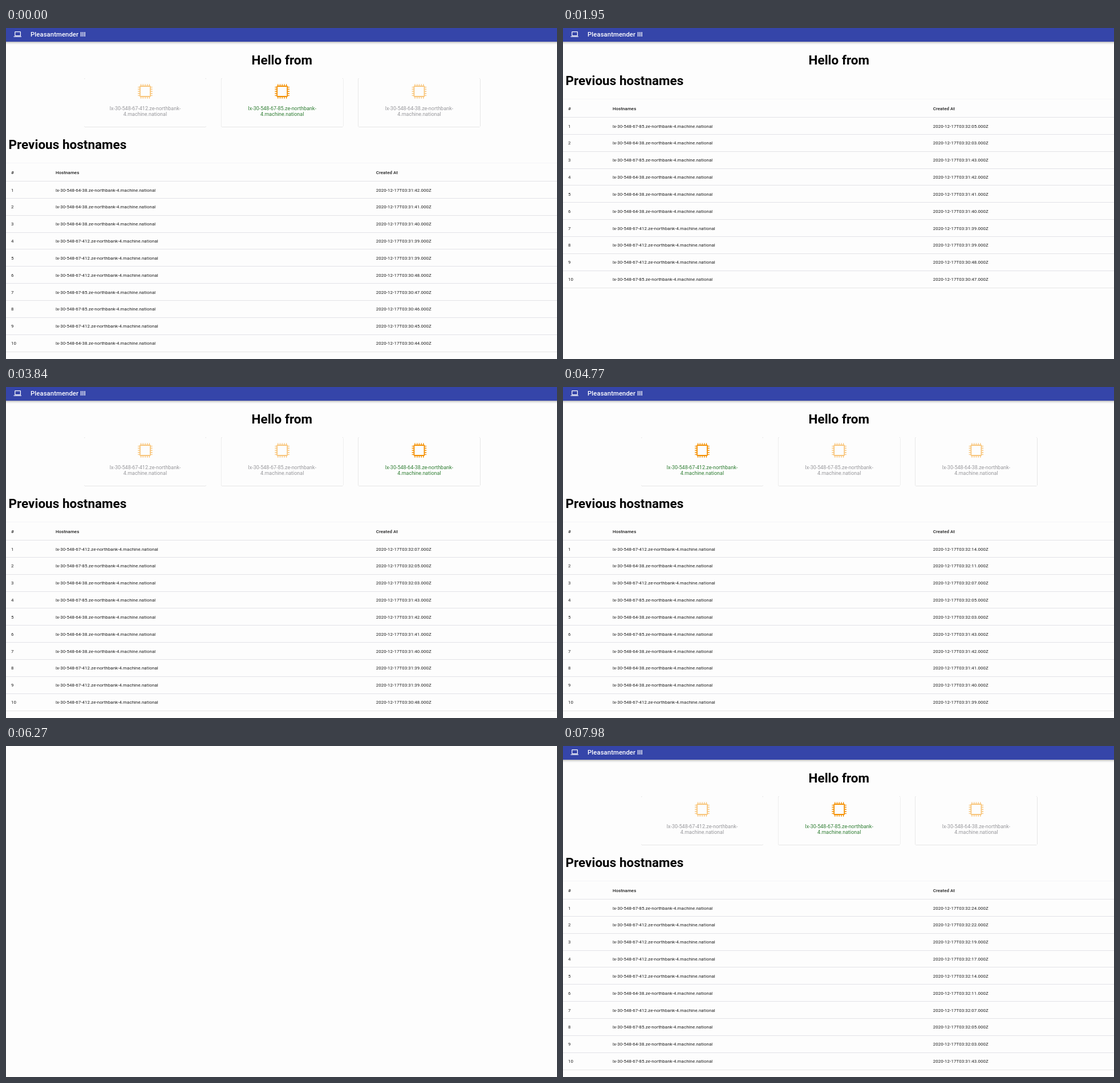
Write an HTML page that moves like this. It is 966 by 580 pixels and loops after 8 s.

```html
<!DOCTYPE html>
<html lang="en">
<head>
<meta charset="utf-8">
<title>Host dashboard</title>
<style>
  html, body { margin: 0; width: 100%; height: 100%; overflow: hidden; background: #fdfdfd; }
  svg { display: block; width: 100vw; height: 100vh; font-family: Roboto, sans-serif; }
  h1, .heading { font-size: 22.5px; font-weight: 700; }
  .bar { fill: #3545a9; filter: drop-shadow(0 1px 2px rgba(0, 0, 0, .38)); }
  .title { font-size: 11.3px; font-weight: 500; letter-spacing: .0075em; fill: #fff; }
  .cell { font-size: 7.88px; letter-spacing: .0107em; fill: #1c1c1c; }
  .head { font-weight: 500; }
  .rule { fill: #e2e2e7; }
  .paper { fill: #fdfdfd; filter: drop-shadow(0 .8px .7px rgba(0, 0, 0, .36)); }
  .host { font-size: 9px; text-anchor: middle; fill: #2e7d32; }
  .chip { fill: none; stroke: #f49000; }
  .idle .host { fill: #97979b; }
  .idle .chip { opacity: .5; }
</style>
</head>
<body>
<svg id="stage" viewBox="0 0 966 580" preserveAspectRatio="none"></svg>
<script>
const LOOP = 8000, ROWS = 10, BLANK = 100, NO_CARDS = 180, ROW_HEIGHT = 29.85;
const stage = document.getElementById('stage');

const hosts = { A: 'lx-30-548-67-412', B: 'lx-30-548-67-85', C: 'lx-30-548-64-38' };
const ZONE = '.ze-northbank-', SUFFIX = '4.machine.national';

// Every visit, oldest first: host key, then minute and second.
const visits = ('C30:44 A30:45 B30:46 B30:47 A30:48 A31:39 A31:39 C31:40 C31:41 C31:42 ' +
  'B31:43 C32:03 B32:05 A32:07 C32:11 A32:14 A32:17 A32:19 A32:22 B32:24 B32:26')
  .split(' ').map(v => ({ host: v[0], time: `2020-12-17T03:${v.slice(1)}.000Z` }));

// Page reloads; some swap pages without a white flash.
const loads = [
  { at: -LOOP }, { at: 480, flash: true }, { at: 1130 }, { at: 1830, flash: true },
  { at: 3000, flash: true }, { at: 4090, flash: true }, { at: 4450, flash: true },
  { at: 5300 }, { at: 6200, flash: true }, { at: 6830, flash: true }, { at: 7450, flash: true }
];

const text = (cls, x, y, content, extra = '') =>
  `<text class="${cls}" x="${x}" y="${y}" ${extra}>${content}</text>`;
const rect = (cls, x, y, w, h, extra = '') =>
  `<rect class="${cls}" x="${x}" y="${y}" width="${w}" height="${h}" ${extra}/>`;

function header() {
  return rect('bar', -5, -5, 976, 29) +
    `<g fill="none" stroke="#fff" stroke-width="1.2">
      <rect x="15.8" y="6.7" width="9.6" height="6.9" rx=".6"/><path d="M13.5 15.1H27"/></g>` +
    text('title', 43, 14.8, 'Pleasantmender III') +
    text('heading', 483.8, 64, 'Hello from', 'text-anchor="middle"');
}

function chip(x, y) {
  let pins = '';
  for (let i = -2; i <= 2; i++) {
    const p = i * 3.7;
    pins += `M${p} -12.8V-9M${p} 9V12.8M-12.8 ${p}H-9M9 ${p}H12.8`;
  }
  return `<g class="chip" transform="translate(${x} ${y})">
    <rect x="-9" y="-9" width="18" height="18" rx=".8" stroke-width="1.8"/>
    <path d="${pins}" stroke-width="1.4"/></g>`;
}

function cards(active) {
  return Object.keys(hosts).map((key, i) => {
    const x = 137 + i * 240.2, center = x + 107;
    return `<g class="${key === active ? '' : 'idle'}">` +
      rect('paper', x, 88, 214, 85.5, 'rx="2"') + chip(center, 111) +
      text('host', center, 143.6, hosts[key] + ZONE) +
      text('host', center, 153.8, SUFFIX) + '</g>';
  }).join('');
}

function tableRow(y, cells, cls = 'cell') {
  return [9, 87, 648.8].map((x, i) => text(cls, x, y, cells[i])).join('');
}

function table(list) {
  let out = text('heading', 4.5, 212.4, 'Previous hostnames') +
    rect('paper', -5, 236, 976, 331.5) +
    rect('rule', 0, 236, 966, 1, 'opacity=".3"') +
    tableRow(255.8, ['#', 'Hostnames', 'Created At'], 'cell head');
  list.forEach((visit, i) => {
    const y = 268 + i * ROW_HEIGHT;
    out += rect('rule', 0, Math.round(y), 966, 1) +
      tableRow(y + 18.5, [i + 1, hosts[visit.host] + ZONE + SUFFIX, visit.time]);
  });
  return out;
}

function page(index, phase) {
  if (phase === 'blank') return '';
  const ready = phase === 'ready';
  return header() + (ready ? cards(visits[index + ROWS].host) : '') +
    `<g transform="translate(0 ${ready ? 0 : -112})">` +
    table(visits.slice(index, index + ROWS).reverse()) + '</g>';
}

let shown;
function frame(now) {
  const t = now % LOOP;
  const index = loads.findLastIndex(load => load.at <= t);
  const { at, flash } = loads[index];
  const age = t - at - (flash ? BLANK : 0);
  const phase = age < 0 ? 'blank' : age < NO_CARDS ? 'loading' : 'ready';
  const state = index + phase;
  if (state !== shown) {
    stage.innerHTML = page(index, phase);
    shown = state;
  }
}

const start = performance.now();
function tick() {
  frame(performance.now() - start);
  requestAnimationFrame(tick);
}
tick();
</script>
</body>
</html>
```
